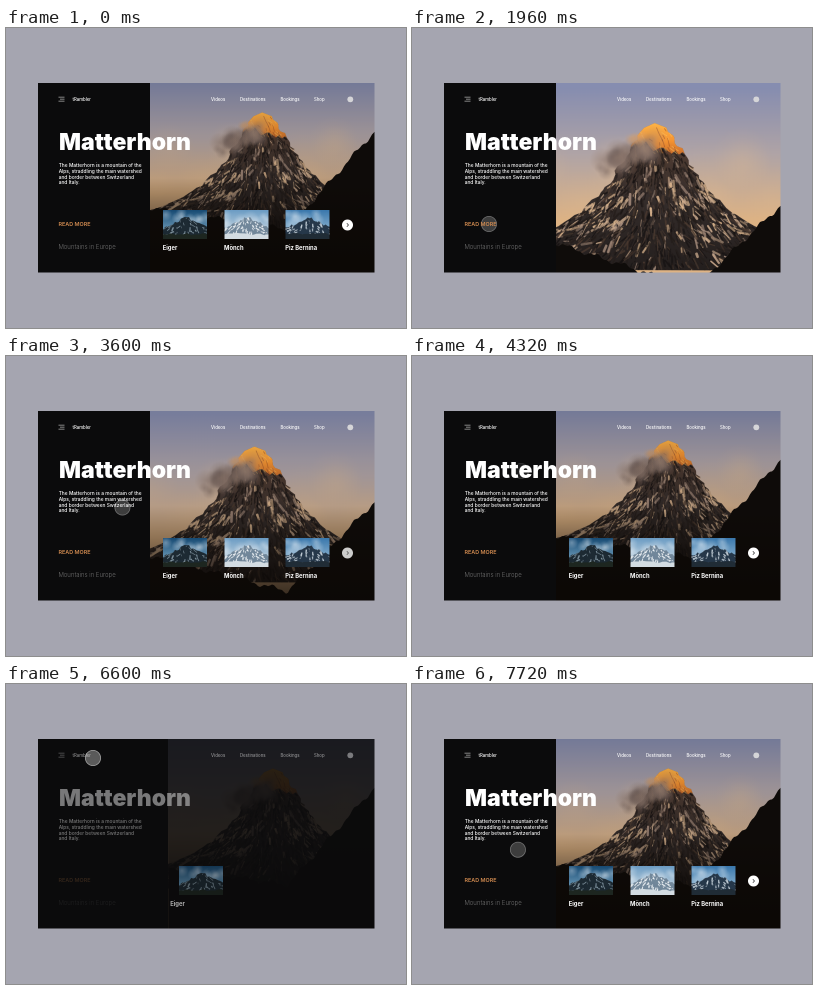
An HTML page with a canvas that plays this animation: 400 px wide and 300 px high, repeating every 7760 ms.

```html
<!DOCTYPE html>
<html lang="en">
<head>
<meta charset="utf-8">
<title>Matterhorn</title>
<style>
  html, body { margin: 0; width: 100%; height: 100%; overflow: hidden; background: #a5a5b0; }
  canvas, svg { position: absolute; left: 0; top: 0; width: 400px; height: 300px; }
  text { font-family: Inter, "Open Sans", sans-serif; fill: #fff; }
  .nav { font-size: 4.3px; font-weight: 500; fill: #ddd; }
  .body { font-size: 4.85px; font-weight: 500; fill: #eee; }
  .label { font-size: 5.8px; font-weight: 700; }
</style>
</head>
<body>
<canvas id="stage" width="800" height="600"></canvas>
<svg viewBox="0 0 400 300">
  <g id="nav" class="nav">
    <path d="M52.5 69.2h6M54 71.2h4.5M52.5 73.2h6" stroke="#bbb" stroke-width=".7"/>
    <text x="66.5" y="72.6">tRambler</text>
    <text x="205" y="72.6">Videos</text>
    <text x="234" y="72.6">Destinations</text>
    <text x="274.5" y="72.6">Bookings</text>
    <text x="308" y="72.6">Shop</text>
    <circle cx="344.3" cy="71.3" r="2.9" fill="#d5d5d8"/>
  </g>
  <g id="copy">
    <text x="53" y="122" font-size="23" font-weight="900">Matterhorn</text>
    <g class="body">
      <text x="52.7" y="138.8">The Matterhorn is a mountain of the</text>
      <text x="52.7" y="144.7">Alps, straddling the main watershed</text>
      <text x="52.7" y="150.6">and border between Switzerland</text>
      <text x="52.7" y="156.4">and Italy.</text>
    </g>
  </g>
  <g id="foot">
    <text x="52.4" y="198.4" font-size="5.45" font-weight="600" style="fill:#d08a50">READ MORE</text>
    <text x="52.4" y="221.3" font-size="6" font-weight="300" style="fill:#707070">Mountains in Europe</text>
  </g>
  <text class="label" x="156.7" y="221.6">Eiger</text>
  <text class="label" x="218" y="221.6">Mönch</text>
  <text class="label" x="279.2" y="221.6">Piz Bernina</text>
</svg>
<script>
const LOOP = 7760;
const BLACK = '#0b0b0c';
const PEAK = { x: 257, y: 85 };
const $ = id => document.getElementById(id);
const ctx = $('stage').getContext('2d');
const labels = document.querySelectorAll('.label');

let seed = 7;
const rnd = () => (seed = seed * 16807 % 2147483647) / 2147483647;
const jitter = n => (rnd() * 2 - 1) * n;
const pick = list => list[Math.floor(rnd() * list.length)];
const mix = (a, b, k) => a + (b - a) * k;

function layer(w, h, k, draw) {
  const c = document.createElement('canvas');
  c.width = w * k;
  c.height = h * k;
  const g = c.getContext('2d');
  g.scale(k, k);
  draw(g);
  return c;
}

function fade(g, y0, y1, ...colors) {
  const f = g.createLinearGradient(0, y0, 0, y1);
  colors.forEach((c, i) => f.addColorStop(i / (colors.length - 1), c));
  return f;
}

function puff(g, x, y, r, rgb, alpha) {
  const f = g.createRadialGradient(x, y, 0, x, y, r);
  f.addColorStop(0, `rgba(${rgb},${alpha})`);
  f.addColorStop(1, `rgba(${rgb},0)`);
  g.fillStyle = f;
  g.fillRect(x - r, y - r, 2 * r, 2 * r);
}

// Path below the curve y = f(x)
function below(g, x0, x1, bottom, step, f) {
  g.beginPath();
  g.moveTo(x0, bottom);
  for (let x = x0; x <= x1; x += step) g.lineTo(x, f(x));
  g.lineTo(x1, bottom);
  g.closePath();
}

function streak(g, x, y, angle, len, width, color, alpha) {
  g.globalAlpha = alpha;
  g.strokeStyle = color;
  g.lineWidth = width;
  g.beginPath();
  g.moveTo(x, y);
  g.lineTo(x + Math.cos(angle) * len, y + Math.sin(angle) * len);
  g.stroke();
  g.globalAlpha = 1;
}

// Half width of the mountain at depth d under its summit
const half = d => 8 + .6 * d + 32 * (d / 90) ** 5;

function mountain(g) {
  g.beginPath();
  for (let d = -120; d <= 120; d += 3) {
    const depth = Math.abs(d);
    g.lineTo(PEAK.x + Math.sign(d) * half(depth) + jitter(1.8), PEAK.y + depth + jitter(1));
  }
  g.closePath();
}

// The photo covers x 134 to 378 and y 40 to 254
const photo = layer(244, 214, 3, g => {
  g.translate(-134, -40);
  g.fillStyle = fade(g, 55, 165, '#868db0', '#b0a4a6', '#deb384');
  g.fillRect(134, 40, 244, 214);
  for (let i = 0; i < 16; i++) puff(g, 150 + rnd() * 220, 105 + rnd() * 60, 15 + rnd() * 20, '232,190,140', .16);

  g.save();
  mountain(g);
  g.clip();
  g.fillStyle = fade(g, 85, 205, '#5e4436', '#352d2b', '#241f1e');
  g.fillRect(134, 40, 244, 214);
  g.lineCap = 'round';
  for (let i = 0; i < 1900; i++) {
    const d = 8 + Math.sqrt(rnd()) * 112, u = jitter(1);
    const angle = Math.atan2(1, u * (.6 + 1.8 * (d / 90) ** 4)) + jitter(.5);
    const field = d > 42 && Math.abs(u) > .3 && Math.sin(d * .28 + u * 5) > -.1;
    const snow = rnd() < (field ? .5 : .1);
    streak(g, PEAK.x + u * half(d), PEAK.y + d, angle, 2 + rnd() * 8, .4 + rnd() * (snow ? 1.9 : 1.3),
      pick(snow ? ['#e2bb92', '#cfae90', '#a98f7e'] : ['#171313', '#241d1a', '#4b3a30', '#2c2522']), .45 + rnd() * .45);
  }
  // Sunlit summit with a ragged lower edge
  g.fillStyle = fade(g, 84, 114, '#ffb548', '#f59432', '#b9622c');
  g.beginPath();
  g.moveTo(290, 80);
  g.lineTo(225, 80);
  for (let x = 225; x < 290; x += 3) g.lineTo(x, 105 + (x - PEAK.x) * .25 + jitter(4));
  g.fill();
  for (let i = 0; i < 45; i++) streak(g, PEAK.x + jitter(18), 88 + rnd() * 20, 1 + jitter(.5), 2 + rnd() * 5, .7, pick(['#8a4522', '#ffc860']), .5);
  g.restore();

  // Cloud drifting off the left shoulder
  for (let i = 0; i < 55; i++) {
    const k = rnd();
    puff(g, mix(214, 254, k) + jitter(4), mix(120, 104, k) + jitter(8), 4 + rnd() * 7, pick(['132,112,104', '160,134,118', '108,92,88']), .42);
  }
  for (let i = 0; i < 8; i++) puff(g, 242 + jitter(9), 97 + jitter(3), 5, '205,158,116', .4);
});

const mono = layer(244, 214, 3, g => {
  g.filter = 'grayscale(1) contrast(1.3) brightness(.55)';
  g.drawImage(photo, 0, 0, 244, 214);
});

function thumb(sky, low, rock, snow, ground, share) {
  return layer(44, 29, 3, g => {
    g.fillStyle = fade(g, 0, 22, sky, low);
    g.fillRect(0, 0, 44, 29);
    for (let i = 0; i < 9; i++) puff(g, rnd() * 44, 3 + rnd() * 12, 4 + rnd() * 5, '235,242,248', .35);
    g.save();
    below(g, 0, 44, 29, 2, x => 7 + Math.abs(x - 23) * .5 + jitter(1.4));
    g.clip();
    g.fillStyle = rock;
    g.fillRect(0, 0, 44, 29);
    for (let i = 0; i < 150; i++) {
      const x = rnd() * 44;
      streak(g, x, 6 + rnd() * 23, Math.atan2(1, (x - 23) * .08) + jitter(.6), 1 + rnd() * 4, .4 + rnd(), rnd() < share ? snow : rock, .85);
    }
    g.restore();
    g.fillStyle = ground;
    below(g, 0, 44, 29, 4, () => 24 + jitter(1.2));
    g.fill();
  });
}

const cards = [
  thumb('#174a73', '#6f9dbb', '#1d2a33', '#8fa3ae', '#1d2620', .4),
  thumb('#6b9cc4', '#c3d4e0', '#71879a', '#f3f6f8', '#d3dce2', .72),
  thumb('#3a78ad', '#8db4d0', '#26384a', '#ccd8e0', '#202c36', .5)
];

function ramp(t, a, b) {
  const u = Math.min(1, Math.max(0, (t - a) / (b - a)));
  return u * u * (3 - 2 * u);
}

// Cursor stops: time, x, y
const STOPS = [[0, 106, 166], [1080, 98, 188], [1700, 77, 196], [2450, 77, 196], [3160, 120, 169],
  [4320, 109, 115], [6000, 180, 118], [6600, 87, 74], [LOOP, 106, 166]];

function cursorAt(t) {
  const i = STOPS.findIndex(s => s[0] > t);
  const a = STOPS[i - 1], b = STOPS[i], k = ramp(t, a[0], b[0]);
  return [mix(a[1], b[1], k), mix(a[2], b[2], k)];
}

function disc(x, y, r) {
  ctx.beginPath();
  ctx.arc(x, y, r, 0, 7);
}

// Visibility of item i, staggered on each return
function shown(t, i) {
  const away = 1250 + i * 50, leave = 4400 + i * 60, back = 2760 + i * 200, enter = 6440 + i * 200;
  return 1 - ramp(t, away, away + 300) + ramp(t, back, back + 340)
    - ramp(t, leave, leave + 350) + ramp(t, enter, enter + 340);
}

// Skyline of the near hills, which sink as the photo zooms
function hills(x, zoom) {
  const left = 215 + .33 * (x - 144), right = 178 + .95 * (368 - x);
  const lift = mix(35, 74, (x - 144) / 224) * (1 - zoom);
  return Math.min(left, right) - lift + Math.sin(x * .7) + Math.sin(x * .23) * 2;
}

function draw(t) {
  const zoom = ramp(t, 1300, 1900) - ramp(t, 3150, 4150);
  const shade = 1 - ramp(t, 1300, 1900) + ramp(t, 2700, 3900);
  const dark = ramp(t, 4400, 5400) - ramp(t, 6440, 7240);
  const [cx, cy] = cursorAt(t);

  ctx.setTransform(2, 0, 0, 2, 0, 0);
  ctx.globalAlpha = 1;
  ctx.fillStyle = '#a5a5b0';
  ctx.fillRect(0, 0, 400, 300);
  ctx.fillStyle = BLACK;
  ctx.fillRect(32, 55, 336.5, 189.5);

  ctx.save();
  ctx.beginPath();
  ctx.rect(144 + 21 * dark, 55, 224.5 - 21 * dark, 189.5);
  ctx.clip();
  const s = 1 + .22 * zoom;
  const px = 254 - 14 * zoom + 12 * dark, py = 86 + 11 * zoom;
  ctx.drawImage(photo, px - 120 * s, py - 46 * s, 244 * s, 214 * s);
  ctx.fillStyle = '#0f0c0a';
  below(ctx, 144, 370, 246, 2, x => hills(x, zoom));
  ctx.fill();
  ctx.globalAlpha = shade;
  ctx.fillStyle = fade(ctx, 55, 245, ...[.14, .1, .12, .6, .97].map(a => `rgba(12,8,5,${a})`));
  ctx.fillRect(144, 55, 225, 190);
  ctx.globalAlpha = .96 * dark;
  ctx.fillStyle = BLACK;
  ctx.fillRect(144, 55, 225, 190);
  ctx.restore();

  cards.forEach((pic, i) => {
    const v = shown(t, i), late = t > 6000;
    const slide = late ? 1 - v : 0;
    const alpha = late ? Math.sqrt(v) : v;
    ctx.globalAlpha = alpha;
    ctx.drawImage(pic, 157 + 61.3 * i + 30 * slide, 182, 44, 29);
    labels[i].setAttribute('opacity', alpha);
    labels[i].setAttribute('transform', `translate(${14 * slide} 0)`);
  });

  ctx.globalAlpha = shown(t, 3);
  ctx.fillStyle = '#fff';
  disc(341.5, 197, 5.5);
  ctx.fill();
  ctx.strokeStyle = '#333';
  ctx.lineWidth = .7;
  ctx.beginPath();
  ctx.moveTo(340.8, 195.2);
  ctx.lineTo(342.5, 197);
  ctx.lineTo(340.8, 198.8);
  ctx.stroke();

  // Cursor, which opens into a lens over the title
  const lens = ramp(t, 4400, 5300) - ramp(t, 6420, 6600);
  const reveal = ramp(t, 4300, 4600) - ramp(t, 6600, 6850);
  const r = 8 + 35 * lens;
  ctx.save();
  ctx.globalAlpha = reveal;
  disc(cx, cy, r);
  ctx.clip();
  ctx.drawImage(mono, 32, 8, 336, 283);
  ctx.restore();
  ctx.globalAlpha = ramp(t, 0, 350) * (1 - .65 * ramp(t, 4100, 4350) + .65 * ramp(t, 6420, 6600));
  ctx.fillStyle = `rgba(150,150,150,${.36 * (1 - reveal)})`;
  ctx.strokeStyle = `rgba(190,190,190,${.5 + .2 * reveal})`;
  ctx.lineWidth = .8;
  disc(cx, cy, r - .4);
  ctx.fill();
  ctx.stroke();

  $('copy').setAttribute('opacity', 1 - .62 * dark);
  $('nav').setAttribute('opacity', 1 - .55 * dark);
  $('foot').setAttribute('opacity', 1 - .9 * dark);
}

function tick() {
  draw(performance.now() % LOOP);
  requestAnimationFrame(tick);
}
tick();
</script>
</body>
</html>
```
